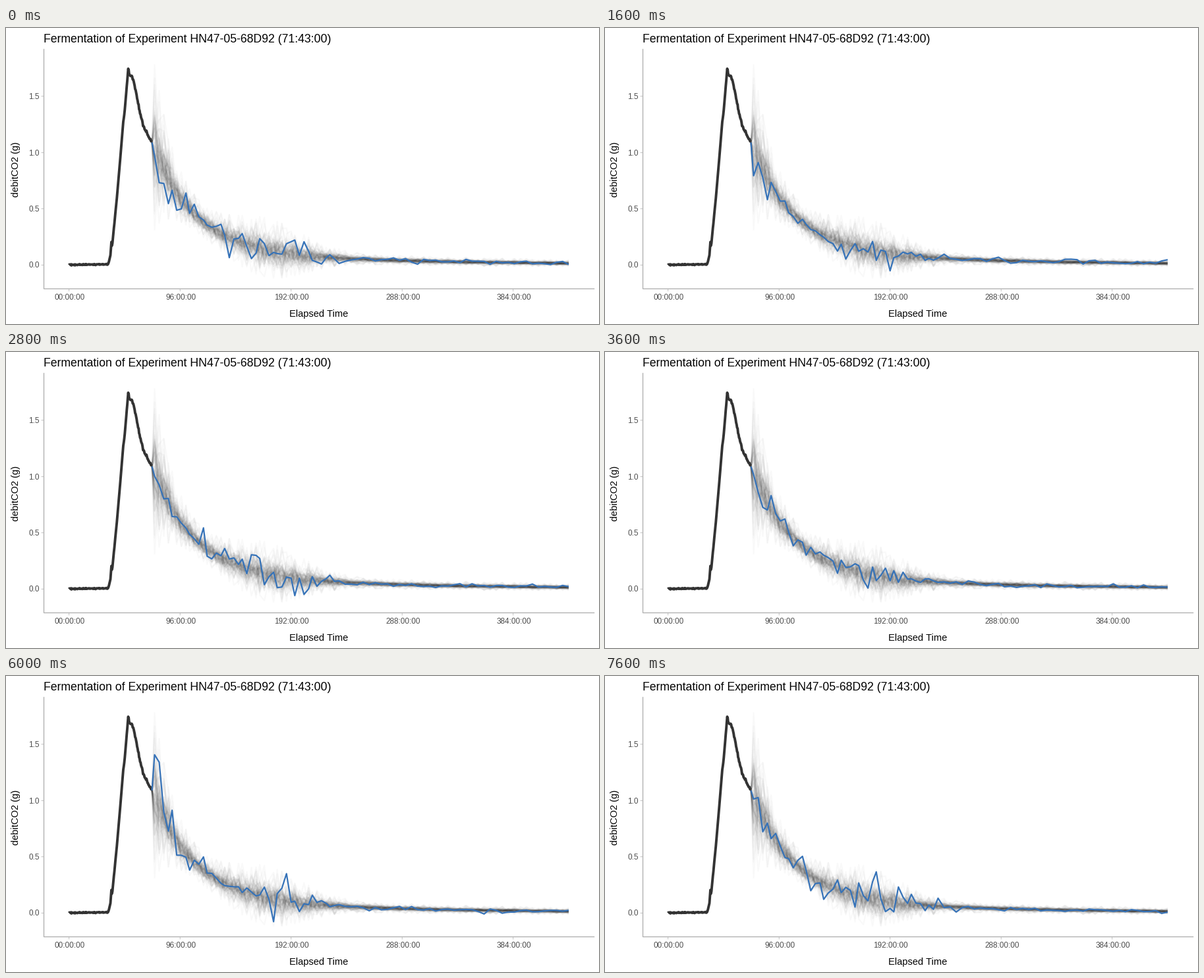
Animation, 900 px wide and 450 px high, one loop 8 s. Source, as a matplotlib script:

```python
import matplotlib.pyplot as plt
import numpy as np
from matplotlib.animation import FuncAnimation
from matplotlib.collections import LineCollection

WIDTH, HEIGHT, DPI = 900, 450, 100
DRAWS, INTERVAL = 20, 400
ZERO_Y, UNIT = 360.3, 171.0
START = (221.5, 174)
DARK, BLUE, AXIS = "#333333", "#3572b8", "#b3b3b3"

plt.rcParams["font.family"] = "Liberation Sans"
rng = np.random.default_rng(71)


def pt(pixels):
    return pixels * 72 / DPI


def to_y(value):
    return ZERO_Y - UNIT * value


# Forecast times: dense at first, sparser in the tail.
k = np.arange(43)
dense = 225.5 + 6.65 * k + 0.35 * (k % 4)
sparse = np.linspace(dense[-1], 854, 39)[1:]
knots = np.concatenate([dense, sparse])

# The forecast decays; its spread is wide at the start and again near 395.
age = knots - 225
mean = 0.9 * np.exp(-age / 66) + 0.12 * np.exp(-age / 310)
spread = (0.23 * np.exp(-age / 26) + 0.024 * np.exp(-age / 700)
          + 0.068 * np.exp(-((knots - 395) / 55) ** 2 / 2))


def forecast():
    """One possible future as (x, y) points in pixels."""
    z = np.clip(rng.standard_t(5, len(knots)) / 1.29, -2.8, 3.2)
    return np.vstack([START, np.column_stack([knots, to_y(mean + spread * z)])])


ensemble = [forecast() for _ in range(100)]
outcomes = [forecast() for _ in range(DRAWS)]

fig = plt.figure(figsize=(WIDTH / DPI, HEIGHT / DPI), dpi=DPI, facecolor="white")
ax = fig.add_axes([0, 0, 1, 1])
ax.set(xlim=(0, WIDTH), ylim=(HEIGHT, 0))
ax.axis("off")


def label(x, y, text, size, color="black", **kwargs):
    ax.text(x, y, text, fontsize=pt(size), color=color, va="baseline", **kwargs)


def line(xs, ys, color, width, **kwargs):
    return ax.plot(xs, ys, color=color, lw=pt(width), snap=False, **kwargs)[0]


# Axes and labels
line([57.5, 57.5, 892.5], [32.5, 396.5, 396.5], AXIS, 1.4)
for i in range(5):
    x = 95.7 + 168.5 * i
    line([x, x], [397, 400], AXIS, 0.8)
    label(x + 1, 413, f"{96 * i:02d}:00:00", 11.73, "#4d4d4d", ha="center")
for i in range(4):
    y = to_y(i / 2)
    line([54, 57], [y, y], AXIS, 0.8)
    label(51, y + 4.2, f"{i / 2:.1f}", 11.73, "#4d4d4d", ha="right")
label(57, 22, "Fermentation of Experiment HN47-05-68D92 (71:43:00)", 17.6)
label(475, 439, "Elapsed Time", 14.67, ha="center")
label(19.5, 215, "debitCO2 (g)", 14.67, ha="center", rotation=90, rotation_mode="anchor")

# Measured part: flat, steep rise, peak, slower fall
key_points = [(95.5, 360), (155, 359.3), (158.5, 345), (160, 325), (161, 333),
              (170, 240), (178, 142), (180, 128), (185.7, 59), (187, 71),
              (191, 73), (194.5, 83), (199, 108), (204, 131), (209, 150),
              (213, 158), (217, 167), START]
measured_x = np.arange(95.5, 222, 0.75)
measured_y = np.interp(measured_x, *zip(*key_points))
measured_y += rng.normal(0, np.where(measured_x > 187, 0.9, 0.35))
line(measured_x, measured_y, DARK, 3.9, zorder=3, solid_capstyle="butt")

ax.add_collection(LineCollection(ensemble, colors=DARK, alpha=0.027,
                                 linewidths=pt(2.2), zorder=4))
outcome = line([], [], BLUE, 2.2, zorder=5, solid_capstyle="butt")


def update(i):
    outcome.set_data(*outcomes[i].T)
    return outcome,


anim = FuncAnimation(fig, update, frames=DRAWS, interval=INTERVAL, repeat=True,
                     repeat_delay=0)
plt.show()
```
